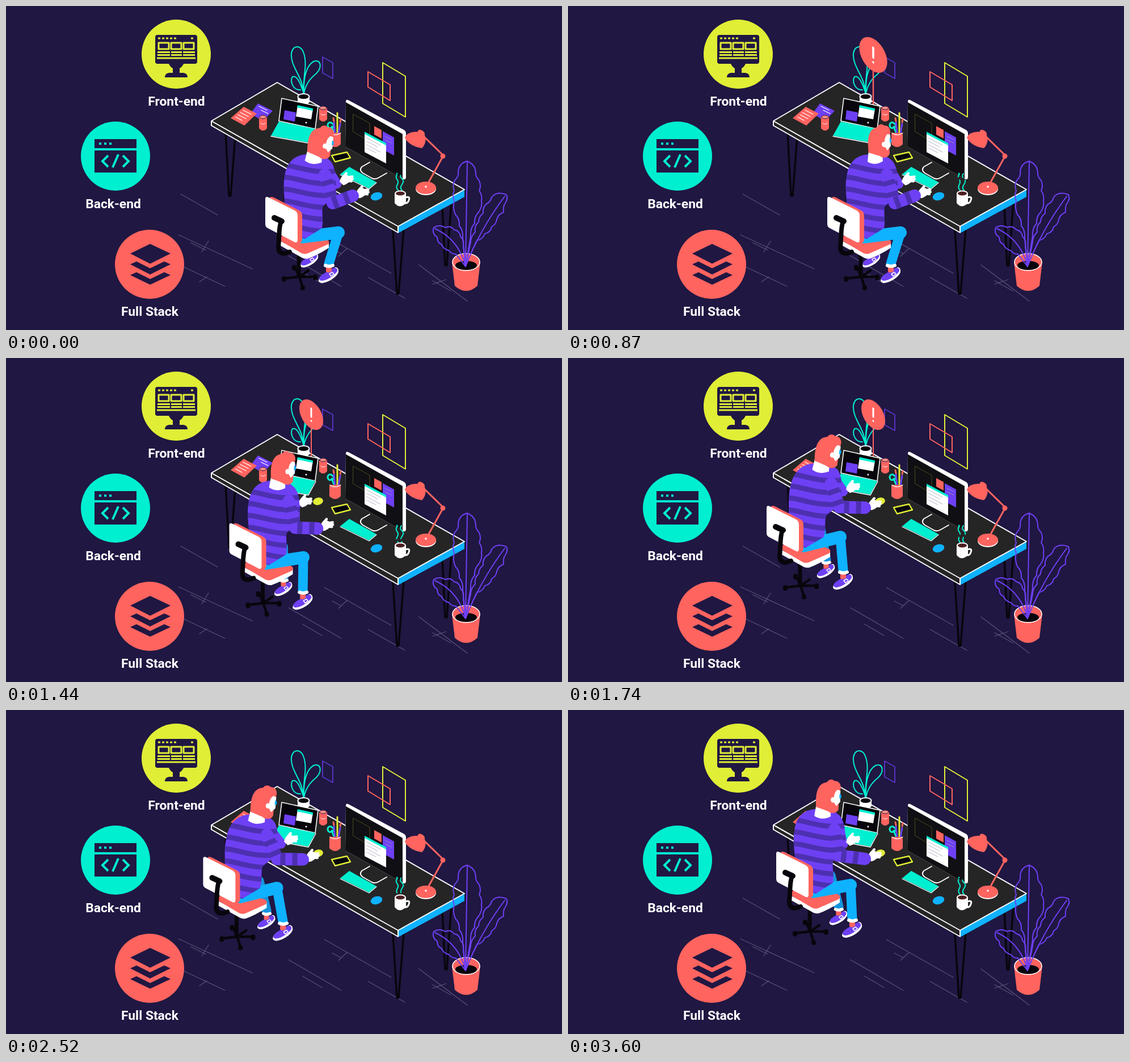
Recreate the animation shown at these times as an HTML page. Size 980 px wide and 572 px high, loop 3630 ms.

```html
<!DOCTYPE html>
<html lang="en">
<head>
<meta charset="utf-8">
<title>Developer at work</title>
<style>
  html, body { margin: 0; height: 100%; overflow: hidden; background: #201742; }
  svg { display: block; width: 100vw; height: 100vh; }
  text { font: 700 22.8px Roboto, sans-serif; fill: #fff; text-anchor: middle; }
  .bg { fill: #201742; } .coral { fill: #ff645f; } .teal { fill: #00efd0; } .purple { fill: #6e40f4; }
  .yellow { fill: #e0ee36; } .blue { fill: #0fb2ff; } .black { fill: #08060c; } .white { fill: #fff; }
  .l { stroke-linecap: round; stroke-linejoin: round; stroke-width: 2; }
  .l.coral { stroke: #ff645f; } .l.teal { stroke: #00efd0; } .l.purple { stroke: #6e40f4; }
  .l.yellow { stroke: #e0ee36; } .l.blue { stroke: #0fb2ff; } .l.black { stroke: #08060c; }
  .l.white { stroke: #fff; } .l.dim { stroke: #585078; stroke-width: 1.3; } .l.far { stroke: #1694dc; }
  path.l { fill: none; }
  .band { fill: none; stroke: #4d30b0; }
</style>
</head>
<body>
<svg viewBox="0 0 980 572" preserveAspectRatio="none">
  <defs>
    <clipPath id="sweater"><path id="torsoShape" d="M528 262C507 264 494 277 491 302C487 325 493 345 492 365C490 385 500 404 527 411L557 392C560 378 556 365 558 354L581 334C582 305 581 286 573 275C566 267 558 264 552 262Z"/></clipPath>
    <g id="hand">
      <path class="l white" style="stroke-width:4.5" d="M-2 3L7 7M0 0L10 4M0 -2L11 0M-4 -5L3 -9"/>
      <path class="white" d="M-13 1Q-8 -8 0 -8Q8 -4 7 3Q2 10 -9 9Z"/>
    </g>
    <g id="shoe">
      <path class="white" d="M-17 9C-16 0 -7 -3 -1 -7L13 -15Q19 -14 18 -6C14 4 -1 12 -10 13Q-16 13 -17 9Z"/>
      <path class="purple" d="M-16 5C-13 -2 -6 -4 -1 -8L10 -14Q17 -14 16 -8C11 0 -3 9 -11 9Q-16 9 -16 5Z"/>
      <path class="coral" d="M-4 -15H6V-8Q0 -3 -4 -7Z"/>
      <path class="l white" style="stroke-width:1.5" d="M2 -3L7 -6M5 1L10 -3M2 -3L5 1M7 -6L10 -3"/>
      <path class="l white" style="stroke-width:6" d="M-5 -18Q1 -15 8 -18"/>
    </g>
  </defs>

  <!-- topic badges -->
  <circle class="yellow" cx="300" cy="85" r="61"/>
  <rect class="bg" x="263" y="51" width="74" height="51" rx="4"/>
  <path class="bg" d="M287 102H313Q311 107 306 110V118H313Q320 119 320 126H280Q280 119 287 118H294V110Q289 107 287 102Z"/>
  <path class="l yellow" stroke-dasharray="4 3" style="stroke-linecap:butt;stroke-width:3" d="M268 57H303M326 57H333"/>
  <path class="l yellow" style="stroke-linecap:butt;stroke-width:3" d="M269 65H287V76H269ZM291 65H309V76H291ZM313 65H331V76H313ZM267 81.5H289M291 81.5H310M312 81.5H333M267 86.5H289M291 86.5H310M312 86.5H333M266 92H334"/>
  <text x="300.5" y="175.5">Front-end</text>

  <circle class="teal" cx="193" cy="265" r="61"/>
  <path class="bg" d="M156 235H230V251H156ZM156 255H230V294H156Z"/>
  <path class="teal" d="M164 241h4v4h-4zM173 241h4v4h-4zM182 241h4v4h-4z"/>
  <path class="l teal" style="stroke-width:4;stroke-linecap:butt;stroke-linejoin:miter" d="M180 264L170 274L180 284M206 264L216 274L206 284M198 262L188 285"/>
  <text x="189" y="356.5">Back-end</text>

  <circle class="coral" cx="253" cy="456" r="61"/>
  <path class="bg" d="M219 437L254 420L290 437L254 455ZM219 456L230 451L254 463L279 451L290 456L254 474ZM219 475L230 470L254 482L279 470L290 475L254 492Z"/>
  <text x="253.5" y="546.5">Full Stack</text>

  <!-- floor and wall -->
  <path class="l dim" d="M308 332L373 369M304 404L434 464M345 434L357 415M326 418L352 431M314 461L386 495M341 487L354 478M498 441L591 495M523 470L557 490M561 405L679 472M586 442L601 428M575 429L590 437M638 479L703 516M728 457L813 521M752 491L776 483M752 485L784 503"/>
  <path class="l yellow" d="M664 100L704 124V196L664 172Z"/>
  <path class="l coral" d="M638 116L677 139V167L638 143Z"/>
  <path class="l purple" style="stroke-width:1.4" d="M558 90L576 100V128L558 118Z"/>

  <!-- desk -->
  <path class="l black" style="stroke-width:3.4" d="M387 222L393 335H396L404 230M682 396L689 508H692L701 394M769 352L774 458H777L785 345"/>
  <path d="M478 135L808 325V336L691 401L362 211V203Z" fill="#262526"/>
  <path class="blue" d="M691 389L808 325V337L691 401Z"/>
  <path class="l white" d="M362 203L478 135L808 324L691 389ZM362 203V211L691 400V389"/>

  <!-- small plant -->
  <path class="l teal" d="M524 155C525 126 501 108 503 84C505 68 521 68 525 84C532 105 522 130 525 155C524 128 529 105 542 98C556 93 557 109 547 119C536 128 528 138 525 155C520 139 513 121 505 125C500 131 505 149 519 148"/>
  <path class="white" d="M514 160V170Q524 179 535 170V160Z"/>
  <ellipse cx="524.5" cy="160" rx="10" ry="5" class="black" stroke="#fff" stroke-width="2"/>

  <g id="alert">
    <path class="l coral" d="M538 122V177"/>
    <g transform="translate(538 100) skewY(28)">
      <ellipse class="coral" rx="21" ry="24.5"/>
      <path class="l white" style="stroke-width:3" d="M0 -11V4M0 11V11.2"/>
    </g>
  </g>

  <!-- papers, cans, laptop -->
  <path class="purple" d="M444 172L470 185L453 203L431 190Z"/>
  <path class="coral" d="M419 178L442 190L420 211L396 198Z"/>
  <path class="l white" style="stroke-width:1.2" d="M418 184L432 191M413 188L427 195M409 192L423 199M405 196L416 202M446 177L460 184M450 184L462 190"/>
  <g id="can">
    <path class="coral" d="M446 196Q453 189 460 196V216Q453 224 446 216Z"/>
    <ellipse cx="453" cy="196" rx="6" ry="3" fill="#ff8f87" stroke="#201742"/>
    <path class="l white" style="stroke-width:1" d="M449 207Q453 210 457 207"/>
  </g>
  <use href="#can" x="106" y="-16"/>
  <path class="black" stroke="#fff" stroke-width="1.6" stroke-linejoin="round" d="M486 163L550 177L545 217L481 203Z"/>
  <path class="teal" d="M481 204L545 217L533 241L467 229Z"/>
  <path class="l white" style="stroke-width:1.4" d="M467 230L533 242L546 218"/>
  <path class="purple" d="M491 184L511 188L509 204L489 200Z"/>
  <path class="white" d="M514 176L541 182L538 200L511 195Z"/>
  <path class="teal" d="M514 175L541 181V185L513 179Z"/>
  <circle class="white" cx="529" cy="206" r="1.4"/>

  <!-- pencil cup -->
  <path class="l teal" style="stroke-width:3" d="M578 223L574 213M574 207a4 5 0 1 0 -1 8a4 4 0 1 0 1 -8"/>
  <path class="l yellow" style="stroke-width:3" d="M584 226V189"/>
  <path class="l purple" style="stroke-width:3" d="M580 225L578 205M586 225L589 208"/>
  <path class="l coral" style="stroke-width:3" d="M578 203L577 198M589 205L590 200"/>
  <path class="coral" d="M570 224H590V244Q580 254 570 244Z"/>
  <path class="l white" style="stroke-width:1.2" d="M571 224Q580 231 590 224"/>

  <!-- monitor -->
  <path class="l white" d="M641 276L627 284Q622 290 629 295L645 304Q651 307 657 303L671 295"/>
  <path class="white" d="M599 167Q601 164 605 167L702 219Q705 221 705 225V303Q704 308 699 305L598 248Z"/>
  <path d="M599 170L699 226V305L598 248Z" fill="#100f13"/>
  <path class="l" stroke="#4a4c20" style="stroke-width:1" d="M612 191L641 207V239L612 222Z"/>
  <path class="coral" d="M649 212L662 219V234L649 227Z"/>
  <path class="purple" d="M664 221L684 232V264L664 253Z"/>
  <path class="white" d="M632 223L670 243V278L632 258Z"/>
  <path class="teal" d="M632 222L670 242V246L632 226Z"/>
  <path class="l" stroke="#b8b4ca" style="stroke-width:1" d="M636 233L660 246M636 239L655 249M636 245L660 258M636 251L652 259"/>
  <path class="l" stroke="#9b89cc" style="stroke-width:1" d="M668 230L680 236M668 236L680 242"/>
  <circle class="teal" cx="689" cy="296" r="1.4"/>

  <!-- desk tools -->
  <path class="teal" d="M605 284L653 311L640 322L589 297Z"/>
  <path class="l white" style="stroke-width:1.2" d="M589 298L640 323L653 312"/>
  <ellipse class="blue" cx="653" cy="336" rx="10.5" ry="7" transform="rotate(-15 653 336)"/>
  <ellipse class="yellow" cx="550" cy="253" rx="9" ry="6.5" transform="rotate(-15 550 253)"/>
  <path class="black" stroke="#e0ee36" stroke-width="2.4" stroke-linejoin="round" d="M574 264L601 258L607 268L580 275Z"/>
  <path class="l white" style="stroke-width:3" d="M704 338Q713 335 710 343Q708 349 703 348"/>
  <path class="white" d="M685 331V348Q694 359 705 348V331Z"/>
  <ellipse cx="695" cy="331" rx="9" ry="4.5" fill="#4b1d1f" stroke="#fff" stroke-width="2"/>
  <g id="steam" stroke-dasharray="29 6">
    <path class="l teal" d="M691 325C683 318 696 313 689 306Q686 301 690 297"/>
    <path class="l teal" d="M698 325C690 318 706 312 698 305Q693 300 697 296"/>
  </g>
  <ellipse class="white" cx="740" cy="323" rx="18" ry="11"/>
  <ellipse class="coral" cx="740" cy="321" rx="18" ry="11"/>
  <path class="l coral" style="stroke-width:3" d="M741 318L771 264L731 225"/>
  <circle class="coral" cx="770" cy="265" r="4.5"/>
  <circle class="white" cx="740" cy="319" r="1.8"/>
  <path class="coral" d="M703 233C705 224 716 222 726 222Q726 217 732 219Q739 222 738 228C742 236 738 247 733 251Q712 248 703 233Z"/>

  <!-- developer -->
  <path id="farLeg" class="l far" style="stroke-width:17"/>
  <use id="farShoe" href="#shoe"/>
  <g class="seat">
    <path class="l black" style="stroke-width:7;stroke-linecap:butt" d="M516 440V480"/>
    <path class="l black" style="stroke-width:4.5" d="M517 478L491 481M517 478L523 497M517 478L545 478M517 478L509 460M517 478L533 467"/>
    <path class="l black" style="stroke-width:8" d="M490 481V483M523 497V498M545 478V480M508 461V463"/>
    <path class="white" d="M478 412L526 437L569 418V427Q549 440 532 446Q526 447 521 444L480 421Z"/>
    <path class="coral" d="M478 411Q500 397 519 394L567 413Q572 417 567 421L531 437Q525 439 520 436Z"/>
  </g>
  <path id="farArm" class="l purple" style="stroke-width:17"/>
  <use id="farHand" href="#hand"/>
  <path id="thigh" class="l blue" style="stroke-width:22"/>
  <path id="shin" class="l blue" style="stroke-width:17"/>
  <use id="nearShoe" href="#shoe"/>
  <g id="torso">
    <use href="#torsoShape" class="purple"/>
    <g clip-path="url(#sweater)"><g id="bands" class="band" stroke-width="9"></g></g>
  </g>
  <g id="head">
    <path class="white" d="M-11 -20L13 -16L14 0Q0 9 -13 1Z"/>
    <path class="coral" d="M-11 -15C-14 -38 -12 -57 4 -60C6 -65 12 -67 16 -63C23 -64 28 -58 27 -50L25 -42L26 -14C24 -5 13 -5 9 -9Q0 -12 -11 -15Z"/>
    <path class="white" d="M22 -48L27 -47L28 -27L22 -19L18 -25Q12 -24 12 -30Q13 -35 17 -34Q17 -43 22 -48Z"/>
    <path class="blue" d="M26 -41Q30 -40 29 -34Q27 -31 26 -34Z"/>
  </g>
  <use id="nearHand" href="#hand"/>
  <path id="arm" class="l purple" style="stroke-width:22"/>
  <path id="armBands" class="band" stroke-width="22" stroke-linejoin="round" stroke-dasharray="9 12" stroke-dashoffset="-10"/>
  <g class="seat">
    <path class="coral" d="M465 338Q467 336 472 338L517 361Q522 364 522 370V413Q521 419 514 419L505 405Z"/>
    <path class="white" d="M457 341Q457 335 463 338L509 361Q514 364 514 370V414Q513 420 507 416L461 392Q457 390 457 385Z"/>
    <path class="l black" style="stroke-width:10" d="M473 374L486 380"/>
    <path class="l black" style="stroke-width:8" d="M485 380C480 392 482 412 480 425Q480 437 491 437L500 434"/>
  </g>

  <!-- large plant -->
  <path class="coral" d="M786 452L791 494Q811 512 831 494L836 452Z"/>
  <ellipse class="coral" cx="811" cy="452" rx="24" ry="15" stroke="#fff" stroke-width="1.5"/>
  <ellipse class="black" cx="811" cy="458" rx="19" ry="8"/>
  <g style="stroke-width:2.2">
    <path class="l purple" d="M813 274Q799 277 797 292q2 8 -6 16q-5 8 -1 18q-4 8 0 18q-3 12 2 24q8 8 7 20q7 8 6 22L810 460M813 274Q828 280 828 296q0 6 6 12q4 10 0 18q6 8 4 18q2 10 -5 20q-8 8 -7 20q-8 8 -7 22L810 460L813 276"/>
    <path class="l purple" d="M882 333Q864 326 856 338q-2 8 -10 12q-6 6 -5 16q-8 6 -8 15q-8 8 -6 18q-8 8 -8 18L810 460M882 333q4 8 -4 18q-2 6 -1 13q-10 4 -12 13q-1 8 -9 13q-2 10 -12 12q-4 10 -14 12q-8 16 -20 46Q835 395 879 336"/>
    <path class="l purple" d="M754 391Q750 402 760 408q0 10 8 13q2 8 13 11q4 6 12 6L810 460M754 391Q764 385 774 391q10 -4 16 4q10 2 11 12q7 6 5 16L810 460Q798 412 756 393"/>
  </g>
</svg>
<script>
const LOOP = 3630;
const $ = id => document.getElementById(id);
const set = (id, name, value) => $(id).setAttribute(name, value);

// chair is an offset from the right workplace; head is [tilt, turn]
const typing = {
  chair: [0, 0], lean: [0], head: [8, 1], elbow: [576, 348], hand: [628, 328], farHand: [600, 305],
  knee: [586, 400], shoe: [568, 476], farKnee: [548, 382], farShoe: [534, 450]
};
const alerted = { ...typing, head: [0, 0] };
const pushing = {
  chair: [-9, -7], lean: [-14], head: [0, 0], elbow: [549, 345], hand: [597, 340], farHand: [559, 284],
  knee: [579, 397], shoe: [570, 476], farKnee: [543, 374], farShoe: [531, 448]
};
const laptop = {
  chair: [-107, -76], lean: [11], head: [8, 1], elbow: [478, 263], hand: [540, 257], farHand: [502, 227],
  knee: [480, 316], shoe: [484, 396], farKnee: [445, 302], farShoe: [454, 377]
};
const settled = { ...laptop, chair: [-110, -78], knee: [477, 315] };
const stepping = {
  ...laptop, chair: [-108, -77], lean: [5], head: [6, .8],
  knee: [480, 311], shoe: [499, 389], farKnee: [450, 300], farShoe: [474, 370]
};
const closer = {
  ...stepping, chair: [-90, -87], lean: [-3], head: [4, .7], elbow: [476, 257],
  knee: [498, 309], shoe: [500, 389], farKnee: [463, 292], farShoe: [476, 368]
};
const timeline = [
  [0, typing], [180, typing], [460, alerted], [960, alerted], [1210, pushing], [1640, laptop],
  [1740, laptop], [2120, settled], [2420, settled], [2760, stepping], [2840, stepping],
  [3220, closer], [LOOP, closer]
];
const popup = [[0, 0], [700, 0], [850, 1.2], [960, .95], [1060, 1], [LOOP, 1]];

// Finds the current segment and its eased progress
function segment(track, t) {
  const i = track.findIndex(([time]) => time > t);
  const [t0, from] = track[i - 1], [t1, to] = track[i];
  const k = (t - t0) / (t1 - t0);
  return [from, to, k * k * (3 - 2 * k)];
}
const line = (...points) => 'M' + points.map(p => p.join(' ')).join('L');
const move = ([x, y]) => `translate(${x} ${y})`;

for (let y = 282; y < 420; y += 21)
  $('bands').innerHTML += `<path d="M480 ${y}C505 ${y - 6} 535 ${y + 18} 590 ${y + 8}"/>`;

function draw(now) {
  const t = now % LOOP;
  const [from, to, k] = segment(timeline, t);
  const p = {};
  for (const part in from) p[part] = from[part].map((v, i) => v + (to[part][i] - v) * k);

  const [cx, cy] = p.chair, lean = p.lean[0];
  const body = (x, y) => [x + cx + lean * (400 - y) / 130, y + cy];
  const tap = t < 900 || t > 1700 ? 1.3 * Math.sin(t / LOOP * Math.PI * 46) : 0;
  p.hand[1] += tap;
  p.farHand[1] -= tap;

  document.querySelectorAll('.seat').forEach(g => g.setAttribute('transform', move(p.chair)));
  const skew = lean / 130;
  set('torso', 'transform', `matrix(1 0 ${-skew} 1 ${cx + 400 * skew} ${cy})`);
  set('head', 'transform', `${move(body(541, 274))} rotate(${p.head[0]}) scale(${1 + .1 * p.head[1]} 1)`);

  const ankle = ([x, y]) => [x + 1, y - 21];
  set('thigh', 'd', line(body(522, 408), p.knee));
  set('shin', 'd', line(p.knee, ankle(p.shoe)));
  set('farLeg', 'd', line(body(522, 396), p.farKnee, ankle(p.farShoe)));
  set('nearShoe', 'transform', move(p.shoe));
  set('farShoe', 'transform', move(p.farShoe) + ' scale(.9)');

  const sleeve = line(body(562, 298), p.elbow, [p.hand[0] - 17, p.hand[1] + 7]);
  set('arm', 'd', sleeve);
  set('armBands', 'd', sleeve);
  set('farArm', 'd', line(body(568, 290), [p.farHand[0] - 17, p.farHand[1] + 9]));
  set('nearHand', 'transform', move(p.hand) + ' rotate(-20)');
  set('farHand', 'transform', move(p.farHand) + ' rotate(-20)');

  const [s0, s1, e] = segment(popup, t);
  const size = s0 + (s1 - s0) * e;
  set('alert', 'transform', `translate(538 177) scale(${size}) translate(-538 -177)`);
  set('alert', 'opacity', Math.max(0, Math.min(1, (2210 - t) / 140)));
  set('steam', 'stroke-dashoffset', -t / LOOP * 105);
  requestAnimationFrame(() => draw(performance.now()));
}
draw(0);
</script>
</body>
</html>
```
